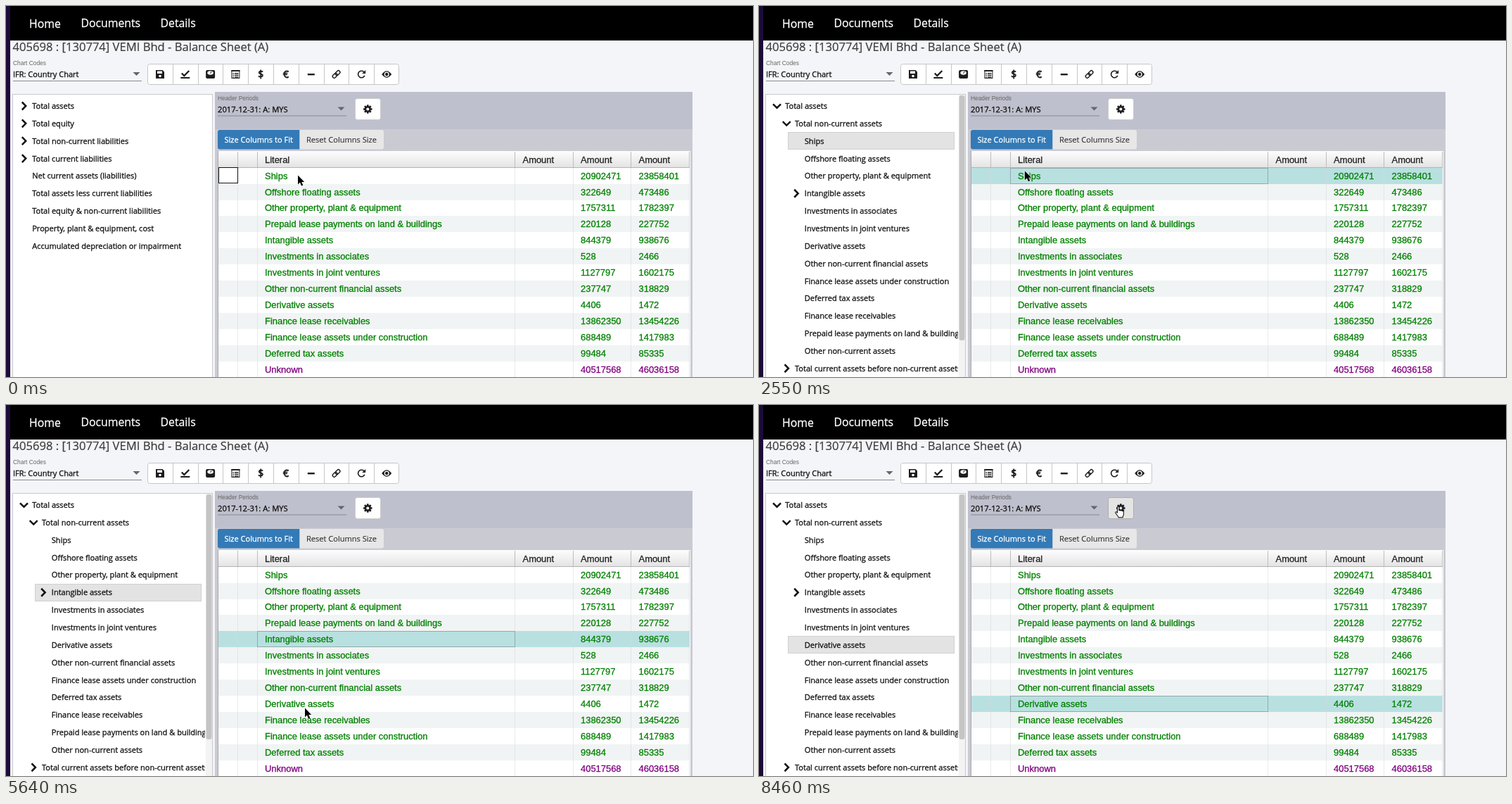
These frames come from a looping animation (1062 by 527 pixels, 9.06 s). An HTML page with a canvas:

```html
<!DOCTYPE html>
<html lang="en">
<head>
<meta charset="utf-8">
<title>Balance Sheet</title>
<style>
html, body { margin: 0; width: 100%; height: 100%; overflow: hidden; background: #f4f5f8; }
canvas { display: block; width: 1062px; height: 527px; }
</style>
</head>
<body>
<canvas id="stage" width="1062" height="527"></canvas>
<script>
const ctx = document.getElementById('stage').getContext('2d');
const LOOP = 9060;
const STEP = 148.3; // the picture advances in equal steps
const SANS = '"Open Sans", "Noto Sans", sans-serif';
const GRID = '"Liberation Sans", Arial, sans-serif';
const INK = '#1d1d1d';

const ROWS = [
  ['Ships', '20902471', '23858401'],
  ['Offshore floating assets', '322649', '473486'],
  ['Other property, plant & equipment', '1757311', '1782397'],
  ['Prepaid lease payments on land & buildings', '220128', '227752'],
  ['Intangible assets', '844379', '938676'],
  ['Investments in associates', '528', '2466'],
  ['Investments in joint ventures', '1127797', '1602175'],
  ['Other non-current financial assets', '237747', '318829'],
  ['Derivative assets', '4406', '1472'],
  ['Finance lease receivables', '13862350', '13454226'],
  ['Finance lease assets under construction', '688489', '1417983'],
  ['Deferred tax assets', '99484', '85335'],
  ['Unknown', '40517568', '46036158']
];

// One line per entry; leading dots give the level, then > closed or v open
const CLOSED = `>Total assets
>Total equity
>Total non-current liabilities
>Total current liabilities
Net current assets (liabilities)
Total assets less current liabilities
Total equity & non-current liabilities
Property, plant & equipment, cost
Accumulated depreciation or impairment`;
const OPEN = `vTotal assets
.vTotal non-current assets
..Ships
..Offshore floating assets
..Other property, plant & equipment
..>Intangible assets
..Investments in associates
..Investments in joint ventures
..Derivative assets
..Other non-current financial assets
..Finance lease assets under construction
..Deferred tax assets
..Finance lease receivables
..Prepaid lease payments on land & buildings
..Other non-current assets
.>Total current assets before non-current assets`;
const parse = lines => lines.split('\n').map(line => {
  const [, dots, mark, label] = line.match(/^(\.*)([>v]?)(.*)$/);
  return { level: dots.length, mark, label };
});
const TREES = { closed: parse(CLOSED), open: parse(OPEN) };

// Where the pointer turns or rests; it eases between these
const PATH = [
  { t: 2390, x: 415, y: 240 }, { t: 2990, x: 112, y: 189 },
  { t: 3420, x: 112, y: 290 }, { t: 3855, x: 413, y: 341 },
  { t: 4900, x: 413, y: 341 }, { t: 5490, x: 424, y: 438 },
  { t: 5635, x: 425, y: 430 }, { t: 6380, x: 425, y: 430 },
  { t: 6970, x: 438, y: 245 }, { t: 7420, x: 430, y: 405 },
  { t: 8450, x: 510, y: 143 }
];
const CLICKS = [
  { t: 740, label: 'Ships', fade: 148 },
  { t: 4300, label: 'Intangible assets', fade: 148 },
  { t: 6370, label: 'Derivative assets', fade: 1 }
];

const clamp = v => Math.max(0, Math.min(1, v));

function pointerAt(t) {
  const next = PATH.findIndex(p => p.t > t);
  if (next === 0) return PATH[0];
  if (next < 0) return PATH[PATH.length - 1];
  const a = PATH[next - 1], b = PATH[next];
  const u = (t - a.t) / (b.t - a.t);
  const k = u * u * (3 - 2 * u);
  return { x: a.x + (b.x - a.x) * k, y: a.y + (b.y - a.y) * k };
}

function pickAt(t) {
  const n = CLICKS.filter(c => c.t <= t).length - 1;
  if (n < 0) return null;
  const { t: since, label, fade } = CLICKS[n];
  const k = clamp((t - since) / fade);
  return {
    label,
    glow: 0.6 + 0.4 * k,
    last: n ? CLICKS[n - 1].label : '',
    lastGlow: 0.42 * (1 - k)
  };
}

function box(x, y, w, h, fill, line) {
  if (fill) { ctx.fillStyle = fill; ctx.fillRect(x, y, w, h); }
  if (line) {
    ctx.strokeStyle = line;
    ctx.lineWidth = 1;
    ctx.strokeRect(x + 0.5, y + 0.5, w - 1, h - 1);
  }
}

function rounded(x, y, w, h, r, fill, line) {
  ctx.beginPath();
  ctx.roundRect(x, y, w, h, r);
  ctx.fillStyle = fill;
  ctx.fill();
  if (line) { ctx.strokeStyle = line; ctx.lineWidth = 1; ctx.stroke(); }
}

function text(str, x, y, size, color, family = SANS, weight = 0.3) {
  ctx.font = size + 'px ' + family;
  ctx.fillStyle = ctx.strokeStyle = color;
  ctx.fillText(str, x, y);
  if (weight) {
    ctx.lineWidth = weight;
    ctx.strokeText(str, x, y);
  }
}

function poly(points, width, color) {
  ctx.beginPath();
  points.forEach(([x, y]) => ctx.lineTo(x, y));
  if (width) { ctx.strokeStyle = color; ctx.lineWidth = width; ctx.stroke(); }
  else { ctx.fillStyle = color; ctx.fill(); }
}

function disc(x, y, r, color) {
  ctx.beginPath();
  ctx.arc(x, y, r, 0, 7);
  ctx.fillStyle = color;
  ctx.fill();
}

function place(x, y, draw) {
  ctx.save();
  ctx.translate(x, y);
  draw();
  ctx.restore();
}

function vertical(y, h, from, to) {
  const g = ctx.createLinearGradient(0, y, 0, y + h);
  g.addColorStop(0, from);
  g.addColorStop(1, to);
  return g;
}

const sign = str => () => {
  ctx.textAlign = 'center';
  text(str, 0, 5, 14, INK, SANS, 0.8);
};

const ICONS = [
  function save() {
    poly([[-6, -6], [3.5, -6], [6, -3.5], [6, 6], [-6, 6]], 0, INK);
    box(-4, -4.5, 7, 3.5, '#fff');
    disc(0, 2.5, 1.8, '#fff');
  },
  function check() {
    poly([[-5, -1.5], [-1.5, 2], [5.5, -5]], 2.3, INK);
    box(-6.5, 4, 13, 2, INK);
  },
  function scale() {
    rounded(-6.5, -6, 13, 12, 2, INK);
    ctx.beginPath();
    ctx.ellipse(0, -2, 4.3, 2.8, 0, 0, 7);
    ctx.fillStyle = '#fff';
    ctx.fill();
    poly([[0, -1], [1.5, -4]], 1, INK);
  },
  function list() {
    box(-6, -6, 12, 12, '#fff', INK);
    box(-6, -6, 12, 2, INK);
    for (let y = -2; y < 5; y += 2.6) {
      box(-4, y, 1.5, 1.4, INK);
      box(-1.5, y, 5.5, 1.4, INK);
    }
  },
  sign('$'),
  sign('€'),
  function minus() { box(-5, -1, 10, 2.4, INK); },
  function link() {
    ctx.rotate(-Math.PI / 4);
    ctx.strokeStyle = INK;
    ctx.lineWidth = 1.4;
    for (const x of [-6.5, -1]) {
      ctx.beginPath();
      ctx.roundRect(x, -2.3, 7.5, 4.6, 2.3);
      ctx.stroke();
    }
  },
  function reload() {
    ctx.beginPath();
    ctx.arc(0, 0, 4.8, 0.4, 5.5);
    ctx.strokeStyle = INK;
    ctx.lineWidth = 1.6;
    ctx.stroke();
    poly([[5.8, -6], [5.8, -1], [0.8, -1]], 0, INK);
  },
  function eye() {
    ctx.beginPath();
    ctx.moveTo(-7, 0);
    ctx.quadraticCurveTo(0, -9.5, 7, 0);
    ctx.quadraticCurveTo(0, 9.5, -7, 0);
    ctx.fillStyle = INK;
    ctx.fill();
    disc(0, 0, 3.5, '#fff');
    disc(0, 0, 2.2, INK);
  }
];

function gear(back) {
  for (let i = 0; i < 8; i++) {
    ctx.rotate(Math.PI / 4);
    box(-1.3, -6.2, 2.6, 3, INK);
  }
  disc(0, 0, 4.6, INK);
  disc(0, 0, 2, back);
}

function picker(label, value, x, y, size) {
  text(label, x, y - 13, 8.35, '#666', GRID, 0);
  text(value, x, y + 4, size, '#111');
  box(x, y + 9, 183, 1, '#8a8a8f');
  poly([[x + 170.5, y - 3], [x + 180.5, y - 3], [x + 175.5, y + 2]], 0, '#66666b');
}

function drawTop() {
  box(0, 0, 1062, 527, '#f4f5f8');
  box(0, 0, 6, 527, '#1c0b3a');
  box(6, 0, 1056, 49, '#000');
  text('Home', 33, 31, 15.8, '#fff');
  text('Documents', 106.5, 29.5, 15.8, '#fff');
  text('Details', 219.5, 29.5, 15.8, '#fff');
  text('405698 : [130774] VEMI Bhd - Balance Sheet (A)', 9.5, 64, 16.6, '#3c3c3c', SANS, 0.2);
  picker('Chart Codes', 'IFR: Country Chart', 10, 97, 11);

  rounded(201.5, 82.5, 357, 29, 3, '#fff', '#c6c6c9');
  ICONS.forEach((icon, i) => {
    if (i) box(Math.round(201 + i * 35.8), 83, 1, 29, '#c6c6c9');
    place(219 + i * 35.8, 97, icon);
  });
}

function chevron(x, y, open) {
  place(x, y, () => {
    if (open) ctx.rotate(Math.PI / 2);
    poly([[-2.7, -5.5], [2.7, 0], [-2.7, 5.5]], 2.5, '#111');
  });
}

function drawTree(pick, pointer) {
  box(9, 125, 285, 403, '#fff', '#c9c9cd');
  if (pick) {
    box(284, 126, 9, 401, '#f3f3f3');
    rounded(284.5, 127, 8, 348, 3, '#c5c5c5');
  }
  ctx.save();
  ctx.beginPath();
  ctx.rect(10, 126, 273, 401);
  ctx.clip();
  TREES[pick ? 'open' : 'closed'].forEach(({ level, mark, label }, i) => {
    const y = 142 + i * 24.85;
    const top = Math.round(y - 12.6);
    const hover = pointer.x < 283 && Math.abs(pointer.y - y) < 12.4;
    if (pick && label === pick.label) box(41, top, 237, 25, '#e3e3e3', '#d0d0d0');
    else if (hover) box(41, top, 237, 25, '#f0f0f0');
    if (mark) chevron(25.5 + level * 13.7, y, mark === 'v');
    text(label, 37.2 + level * 13.8, y + 4, 11.05, '#111');
  });
  ctx.restore();
}

function drawPanel(hot) {
  box(297, 122, 679, 405, '#cacbd2');
  box(297, 122, 679, 53, '#bfc0cd');
  picker('Header Periods', '2017-12-31: A: MYS', 301, 146.5, 11.2);
  const back = hot ? '#e4e4e4' : '#fff';
  rounded(496.5, 131.5, 36, 30, 3, back, hot ? '#adadad' : '#cccccc');
  place(514.3, 146.5, () => gear(back));
  rounded(301, 176, 116.5, 27.5, [3, 0, 0, 3], '#337ab7');
  rounded(417.5, 176, 119.5, 27.5, [0, 3, 3, 0], '#e7e7e8');
  text('Size Columns to Fit', 310.5, 193.7, 11.05, '#fff');
  text('Reset Columns Size', 427, 193.7, 11.05, '#333', SANS, 0.15);
}

function columnLines(y, h, color, dash) {
  ctx.setLineDash(dash);
  for (const x of [329.5, 357.5, 723.5, 806.5, 888.5, 971.5]) {
    poly([[x, y], [x, y + h]], 1, color);
  }
  ctx.setLineDash([]);
}

function drawGrid(pick) {
  const size = 12.95;
  const rowTop = i => Math.round(229.7 + i * 22.92);
  box(301, 206, 672, 321, '#fff');
  box(302, 206, 670, 23, vertical(206, 23, '#fdfdfd', '#e4e4e4'));
  columnLines(207, 22, '#bdbdbd', []);
  text('Literal', 368, 222.6, size, '#222', GRID);
  [734.5, 817, 899.5].forEach(x => text('Amount', x, 222.6, size, '#222', GRID));

  ROWS.forEach((row, i) => {
    const top = rowTop(i), h = rowTop(i + 1) - top;
    box(302, top, 670, h, i % 2 ? '#f1f4f4' : '#fff');
    if (pick) {
      ctx.globalAlpha = row[0] === pick.label ? pick.glow
        : row[0] === pick.last ? pick.lastGlow : 0;
      box(302, top, 670, h, '#b9e0e1');
      ctx.globalAlpha = 1;
    }
    const ink = row[0] === 'Unknown' ? '#800080' : '#008000';
    [368, 817, 899.5].forEach((x, k) => text(row[k], x, 245.6 + i * 22.92, size, ink, GRID));
  });
  columnLines(230, 297, '#d3d7d9', [1, 1]);
  box(301, 206, 1, 321, '#a9a9ad');
  box(302, 229, 670, 1, '#b4b4b6');

  if (pick) {
    const i = ROWS.findIndex(row => row[0] === pick.label);
    box(357, rowTop(i), 367, 23, null, '#93a9aa');
  } else {
    box(302, 229, 28, 23, null, '#111');
  }
}

const HAND = new Path2D('M3.2 1.6c0-2 2.6-2 2.6 0v5c.3-1.2 2.5-1.1 2.6.3.4-1 2.4-.8 2.5.5' +
  '.5-.7 2-.4 2 1v4c0 2-1.4 2.6-1.4 4.6h-6.5c0-1.6-3.5-4.6-4.6-6.8-.8-1.6 1-2.4 2-1.2l.8 1z');
const ARROW = new Path2D('M0 0V14L3.2 11L5.5 16.2L8 15.1L5.7 10.2H10Z');

function drawPointer({ x, y }, hand) {
  place(x - (hand ? 3.5 : 0), y + (hand ? 1 : 0.5), () => {
    ctx.scale(0.92, 0.92);
    ctx.lineJoin = 'round';
    ctx.lineWidth = 1.1;
    ctx.strokeStyle = hand ? '#000' : '#fff';
    ctx.fillStyle = hand ? '#fff' : '#000';
    const shape = hand ? HAND : ARROW;
    if (hand) ctx.fill(shape);
    ctx.stroke(shape);
    if (!hand) ctx.fill(shape);
  });
}

function render(time) {
  const t = Math.floor(time / STEP) * STEP;
  const pointer = pointerAt(t);
  const pick = pickAt(t);
  const { x, y } = pointer;
  const hot = x > 496 && x < 533 && y > 131 && y < 162;
  drawTop();
  drawTree(pick, pointer);
  drawPanel(hot);
  drawGrid(pick);
  drawPointer(pointer, hot);
}

const start = performance.now();
function tick() {
  render((performance.now() - start) % LOOP);
  requestAnimationFrame(tick);
}
tick();
</script>
</body>
</html>
```
